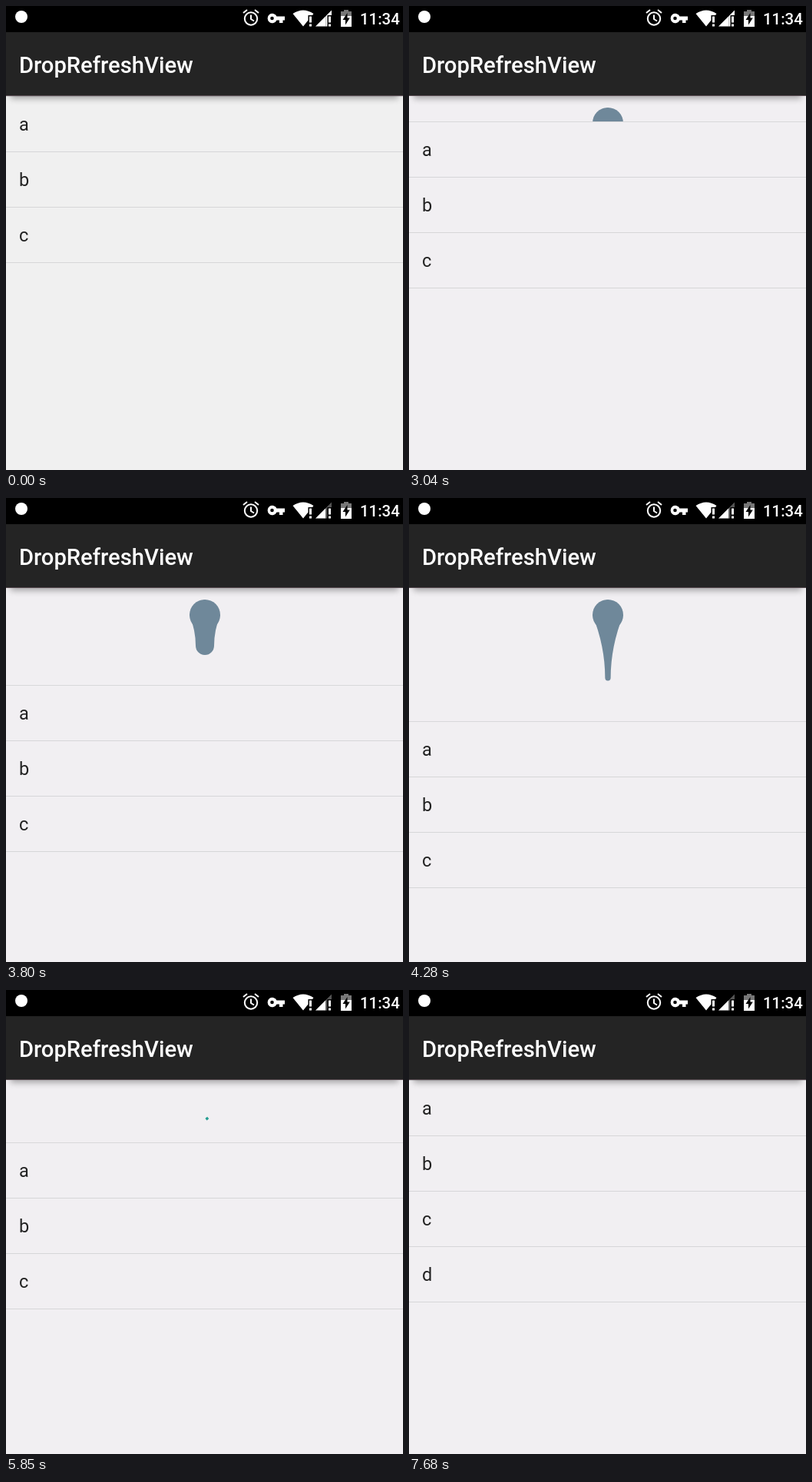
An HTML page for the animation above (9580 ms loop, 517 px wide and 603 px high).

```html
<!DOCTYPE html>
<html lang="en">
<head>
<meta charset="utf-8">
<title>DropRefreshView</title>
<style>
  html, body { margin: 0; width: 100%; height: 100%; overflow: hidden; background: #f0f0f0; }
  svg { display: block; width: 517px; height: 603px; font-family: Roboto, sans-serif; }
</style>
</head>
<body>
<svg viewBox="0 0 517 603">
  <defs>
    <filter id="soft" x="-10%" y="-50%" width="120%" height="200%">
      <feGaussianBlur stdDeviation="4.5"/>
    </filter>
  </defs>
  <rect id="back" width="517" height="603"/>
  <g id="drop" fill="#6f889a">
    <circle cx="259" cy="152" r="20"/>
    <path id="tail"/>
  </g>
  <circle id="spinner" cx="251.5" cy="154.5" r="16.3" pathLength="360" fill="none"
          stroke="#269e92" stroke-width="3.4" stroke-linecap="square"/>
  <g id="list">
    <rect id="sheet" y="117" width="517" height="603"/>
    <rect y="117" width="517" height="1" fill="#d8d8da"/>
  </g>

  <rect x="6" y="60" width="505" height="60" opacity=".34" filter="url(#soft)"/>
  <rect width="517" height="116" fill="#242424"/>
  <rect y="116" width="517" height="1" fill="#574a50"/>
  <rect width="517" height="34"/>
  <text x="17" y="87" font-size="29.2" font-weight="500" fill="#fff">DropRefreshView</text>

  <g fill="#fff">
    <circle cx="20" cy="14" r="8"/>
    <g fill="none" stroke="#fff" stroke-width="2">
      <circle cx="319" cy="16.5" r="8.2"/>
      <path d="M319 11.5V17L323 19.5M309 9L314 5M329 9L324 5"/>
    </g>
    <path fill-rule="evenodd" d="M352.5 13.5H363V18.5H360.5V22H356V18.5H352.5A6.2 6.2 0 1 1 352.5 13.5ZM346.5 13.7A2.3 2.3 0 1 0 346.5 18.3A2.3 2.3 0 1 0 346.5 13.7Z"/>
    <path d="M387 26.5L373.5 10Q387 1 400.5 10L399 12H393.5V18.5Z"/>
    <path d="M395 13.5H398V21.5H395ZM395 23.5H398V26.5H395Z"/>
    <path d="M403 26.5L416.5 13V26.5Z"/>
    <path id="weak" d="M416.5 13L424 5.5V12H418.5V26.5H416.5Z"/>
    <path d="M420 13.5H423V21.5H420ZM420 23.5H423V26.5H420Z"/>
    <path fill="#777" d="M440 5H446V7H450V13H436V7H440Z"/>
    <path d="M436 13H450V27H436Z"/>
    <path fill="#000" d="M444.5 9L438.5 18H442V24.5L447.8 15.5H444.5Z"/>
    <text x="461" y="23.5" font-size="20.4" font-weight="500">11:34</text>
  </g>
</svg>
<script>
const LOOP = 9580, PULL = 2460, RELEASE = 4350, SPIN = 4575, DONE = 7400, REST = 7680;
const SIGNAL_DROP = 3440;
const TICK = 58.3, HEADER = 81, PEAK = 177, SPIN_CYCLE = 1286;
const drag = [[PULL, 12], [3040, 33], [3390, 62], [3800, 126], [4100, 162], [4330, PEAK], [RELEASE, PEAK]];

const $ = id => document.getElementById(id);
const clamp = x => Math.min(1, Math.max(0, x));
const mix = (a, b, k) => a + (b - a) * k;
const swing = x => (1 - Math.cos(Math.PI * clamp(x))) / 2;
const show = (el, on) => el.setAttribute('visibility', on ? 'visible' : 'hidden');

const rows = [...'abcd'].map((label, i) => {
  const row = document.createElementNS('http://www.w3.org/2000/svg', 'g');
  row.innerHTML = `<text x="17" y="${162 + 72 * i}" font-size="23.5" fill="#222">${label}</text>
    <rect y="${189 + 72 * i}" width="517" height="1" fill="#d6d6d8"/>`;
  $('list').append(row);
  return row;
});

// cubic-bezier(.4, 0, .2, 1)
function ease(x) {
  x = clamp(x);
  let lo = 0, hi = 1;
  for (let i = 0; i < 24; i++) {
    const s = (lo + hi) / 2, q = 1 - s;
    if (1.2 * q * q * s + 0.6 * q * s * s + s * s * s < x) lo = s; else hi = s;
  }
  return lo * lo * (3 - 2 * lo);
}

function pullOffset(t) {
  if (t < PULL || t >= REST) return 0;
  if (t >= DONE) return HEADER * (1 - swing((t - DONE) / (REST - DONE)));
  if (t >= RELEASE) return mix(PEAK, HEADER, swing((t - RELEASE) / 250));
  const i = drag.findIndex(([time]) => time > t);
  const [t0, a] = drag[i - 1], [t1, b] = drag[i];
  return mix(a, b, (t - t0) / (t1 - t0));
}

function drawDrop(offset) {
  const stretch = Math.max(0, offset - HEADER) / 45;
  const y = 152 + 40 * stretch, r = 20 - 8 * stretch, mid = (152 + y) / 2;
  $('tail').setAttribute('d', `M239 152H279Q${259 + r} ${mid} ${259 + r} ${y}
    A${r} ${r} 0 0 1 ${259 - r} ${y}Q${259 - r} ${mid} 239 152Z`);
}

function drawSpinner(t) {
  const turns = Math.max(0, t - SPIN) / SPIN_CYCLE, p = turns % 1;
  const start = 270 * ease(2 * p - 1), end = 270 * ease(2 * p);
  const angle = 144 * turns + 90 * p + start - 90;
  $('spinner').setAttribute('stroke-dasharray', `${Math.max(0.5, end - start)} 360`);
  $('spinner').setAttribute('transform', `rotate(${angle} 251.5 154.5)`);
}

// The moving part advances in coarse ticks.
function tickTime(t) {
  if (t < PULL || t >= REST) return t;
  return PULL + TICK * Math.floor((t - PULL) / TICK + 0.1);
}

function render(now) {
  const t = tickTime(now % LOOP);
  const offset = Math.round(pullOffset(t));
  const tint = t < PULL + 50 ? '#f0f0f0' : '#f1eff2';
  $('back').setAttribute('fill', tint);
  $('sheet').setAttribute('fill', tint);
  $('weak').setAttribute('fill', t < SIGNAL_DROP ? '#fff' : '#555');
  $('list').setAttribute('transform', `translate(0 ${offset})`);
  show($('drop'), t >= PULL && t < SPIN);
  show($('spinner'), t >= SPIN && t < DONE);
  show(rows[3], t >= DONE);
  drawDrop(offset);
  drawSpinner(t);
}

const begin = performance.now();
function loop() {
  render(performance.now() - begin);
  requestAnimationFrame(loop);
}
loop();
</script>
</body>
</html>
```
